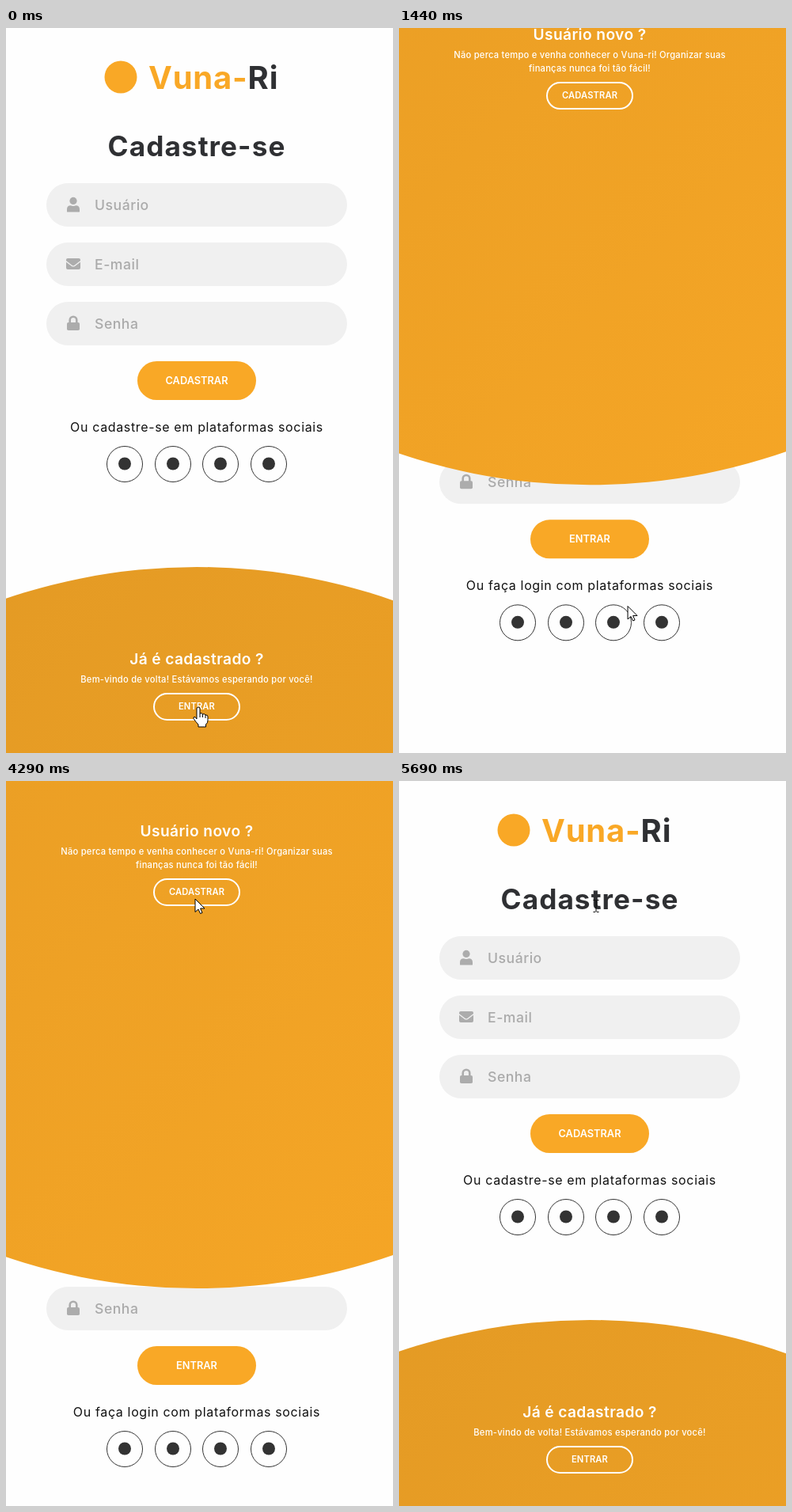
Animation, 489 px wide and 916 px high, one loop 5.76 s. Source, as an HTML page:

```html
<!DOCTYPE html>
<html lang="pt">
<head>
<meta charset="utf-8">
<title>Cadastro</title>
<style>
  html, body { margin: 0; width: 100%; height: 100%; overflow: hidden; background: #fefefe; }
  svg { display: block; width: 489px; height: 916px; font-family: Inter, "Open Sans", sans-serif; }
  .mid { text-anchor: middle; }
  .brand { font-size: 40px; font-weight: 700; letter-spacing: .02em; }
  .title { font-size: 35.2px; font-weight: 700; letter-spacing: .03em; fill: #2f3033; }
  .hint { font-size: 17.6px; font-weight: 500; letter-spacing: .03em; fill: #aaa; }
  .social { font-size: 16px; letter-spacing: .04em; fill: #111; }
  .action { font-size: 12.8px; font-weight: 600; fill: #fff; }
  .panel { fill: #fff; }
  .head { font-size: 19.2px; font-weight: 600; letter-spacing: .02em; }
  .note { font-size: 11.2px; font-weight: 500; letter-spacing: .02em; }
  .small { font-size: 11.2px; font-weight: 600; letter-spacing: .01em; }
  .cursor { fill: #fff; stroke: #000; stroke-linejoin: round; }
</style>
</head>
<body>
<svg viewBox="0 0 489 916">
  <defs>
    <linearGradient id="amber" x1="1" y1="1" x2="0" y2="0">
      <stop stop-color="#f9a826"/>
      <stop offset="1" stop-color="#e09824"/>
    </linearGradient>
    <g id="user" fill="#acacac">
      <circle cy="-4.6" r="4.6"/>
      <path d="M-8 9V6Q-8 1.2-3.4 1.2Q0 2.8 3.4 1.2Q8 1.2 8 6V9Q8 9.5 7 9.5H-7Q-8 9.5-8 9Z"/>
    </g>
    <g id="mail" fill="#acacac">
      <path d="M-9-5Q-9-7-7-7H7Q9-7 9-5V-4L1.5 1.7Q0 2.7-1.5 1.7L-9-4Z"/>
      <path d="M-9-2.2L-2 3Q0 4.2 2 3L9-2.2V5Q9 7 7 7H-7Q-9 7-9 5Z"/>
    </g>
    <g id="lock">
      <path d="M-4.3 0V-4A4.3 4.3 0 0 1 4.3-4V0" fill="none" stroke="#acacac" stroke-width="2.6"/>
      <rect x="-8" y="-1" width="16" height="10" rx="1.8" fill="#acacac"/>
    </g>
  </defs>
  <g id="signUp"></g>
  <g id="signIn"></g>
  <circle id="disc" cx="241" r="750" fill="url(#amber)"/>
  <g id="left" class="panel"></g>
  <g id="right" class="panel"></g>
  <g id="pointer" class="cursor">
    <path id="arrow" d="M0 0V16.5L4 13L6.6 18.5L9 17.5L6.6 12H12Z"/>
    <g id="hand">
      <path d="M-2 15V2Q-2 0 0 0T2 2V8Q5 7 5.5 9Q8.5 8 9 10Q12 9.5 12 12V17Q12 20 9.5 22V25H0V22Q-3 19-6 14.5Q-6.5 12-4 12.5Z"/>
      <path d="M2 8V13M5.5 9V13M9 10V14" fill="none"/>
    </g>
    <path id="beam" d="M-3.5-7.5H-1L0-6.5L1-7.5H3.5M0-6.5V6.5M-3.5 7.5H-1L0 6.5L1 7.5H3.5" fill="none"/>
  </g>
</svg>
<script>
const LOOP = 5760, RATE = .965, TO_LOGIN = 58, TO_SIGNUP = 3693;
const $ = id => document.getElementById(id);
const label = (cls, y, text) => `<text class="mid ${cls}" x="241" y="${y}">${text}</text>`;

function form(title, fields, action, social) {
  const end = 196 + fields.length * 75;
  const inputs = fields.map(([icon, hint], i) => {
    const y = 196 + i * 75;
    return `<rect x="51" y="${y}" width="380" height="55" rx="27.5" fill="#f0f0f0"/>
      <use href="#${icon}" x="85" y="${y + 27}"/>
      <text class="hint" x="112" y="${y + 34}">${hint}</text>`;
  });
  const rings = [150, 211, 271, 332].map(x =>
    `<circle cx="${x}" cy="${end + 130}" r="22.5" fill="none" stroke="#333"/>
     <circle cx="${x}" cy="${end + 129.5}" r="8" fill="#333"/>`);
  return `<circle cx="145" cy="62" r="20.5" fill="#f9a826"/>
    <text class="brand" x="180" y="77" fill="#f9a826">Vuna-<tspan fill="#2f3033">Ri</tspan></text>
    ${label('title', 162, title)}${inputs.join('')}
    <rect x="166" y="${end}" width="150" height="49" rx="24.5" fill="#f9a826"/>
    ${label('action', end + 29, action)}${label('social', end + 89, social)}${rings.join('')}`;
}

function panel(y, title, notes, action) {
  const top = y + 20 + notes.length * 17;
  return label('head', y, title) +
    notes.map((n, i) => label('note', y + 23 + i * 17, n)).join('') +
    `<rect x="187" y="${top}" width="108" height="33" rx="16.5" fill="none" stroke="#fff" stroke-width="2"/>` +
    label('small', top + 20, action);
}

const user = ['user', 'Usuário'], mail = ['mail', 'E-mail'], lock = ['lock', 'Senha'];
$('signUp').innerHTML = form('Cadastre-se', [user, mail, lock], 'CADASTRAR', 'Ou cadastre-se em plataformas sociais');
$('signIn').innerHTML = form('Entrar', [user, lock], 'ENTRAR', 'Ou faça login com plataformas sociais');
$('left').innerHTML = panel(70, 'Usuário novo ?',
  ['Não perca tempo e venha conhecer o Vuna-ri! Organizar suas', 'finanças nunca foi tão fácil!'], 'CADASTRAR');
$('right').innerHTML = panel(804, 'Já é cadastrado ?',
  ['Bem-vindo de volta! Estávamos esperando por você!'], 'ENTRAR');

const clamp = x => Math.min(1, Math.max(0, x));

// cubic-bezier(.42, 0, .58, 1)
function easeInOut(x) {
  let lo = 0, hi = 1, s = .5;
  for (let i = 0; i < 22; i++) {
    const r = 1 - s;
    if (1.26 * s * r * r + 1.74 * s * s * r + s * s * s < x) lo = s; else hi = s;
    s = (lo + hi) / 2;
  }
  return s * s * (3 - 2 * s);
}

// pointer path: time, x, y
const path = [[0, 243, 858], [500, 243, 858], [830, 246, 836], [1440, 289, 731],
  [2360, 327, 246], [3280, 239, 149], [LOOP, 239, 149]];

function pointerAt(t) {
  const i = path.findIndex(p => p[0] > t);
  const [t0, x0, y0] = path[i - 1], [t1, x1, y1] = path[i];
  const k = (t - t0) / (t1 - t0);
  return [x0 + (x1 - x0) * k, y0 + (y1 - y0) * k];
}

const move = (id, x, y) => $(id).setAttribute('transform', `translate(${x} ${y})`);
const show = (id, on) => $(id).setAttribute('visibility', on ? 'visible' : 'hidden');

function draw(t) {
  const back = t >= TO_SIGNUP;
  const clock = (t - (back ? TO_SIGNUP : TO_LOGIN)) / RATE;
  const phase = (delay, length, ease = easeInOut) => {
    const p = ease(clamp((clock - delay) / length));
    return back ? 1 - p : p;
  };

  $('disc').setAttribute('cy', 1431 - 1925 * phase(0, 2000));

  const drop = 330.5 * phase(800, 1000);
  const fade = phase(700, 200, x => x);
  move('signUp', 0, drop);
  move('signIn', 0, drop + 37.5);
  $('signUp').setAttribute('opacity', 1 - fade);
  $('signIn').setAttribute('opacity', fade);

  const slide = 300 * phase(800, 900);
  move('left', 0, slide - 300);
  move('right', 0, slide);

  const beam = t > 5250, hand = t < 600;
  move('pointer', ...(beam ? [249, 158] : pointerAt(t)));
  show('beam', beam);
  show('hand', hand);
  show('arrow', !beam && !hand);
}

function tick() {
  draw(performance.now() % LOOP);
  requestAnimationFrame(tick);
}
tick();
</script>
</body>
</html>
```
